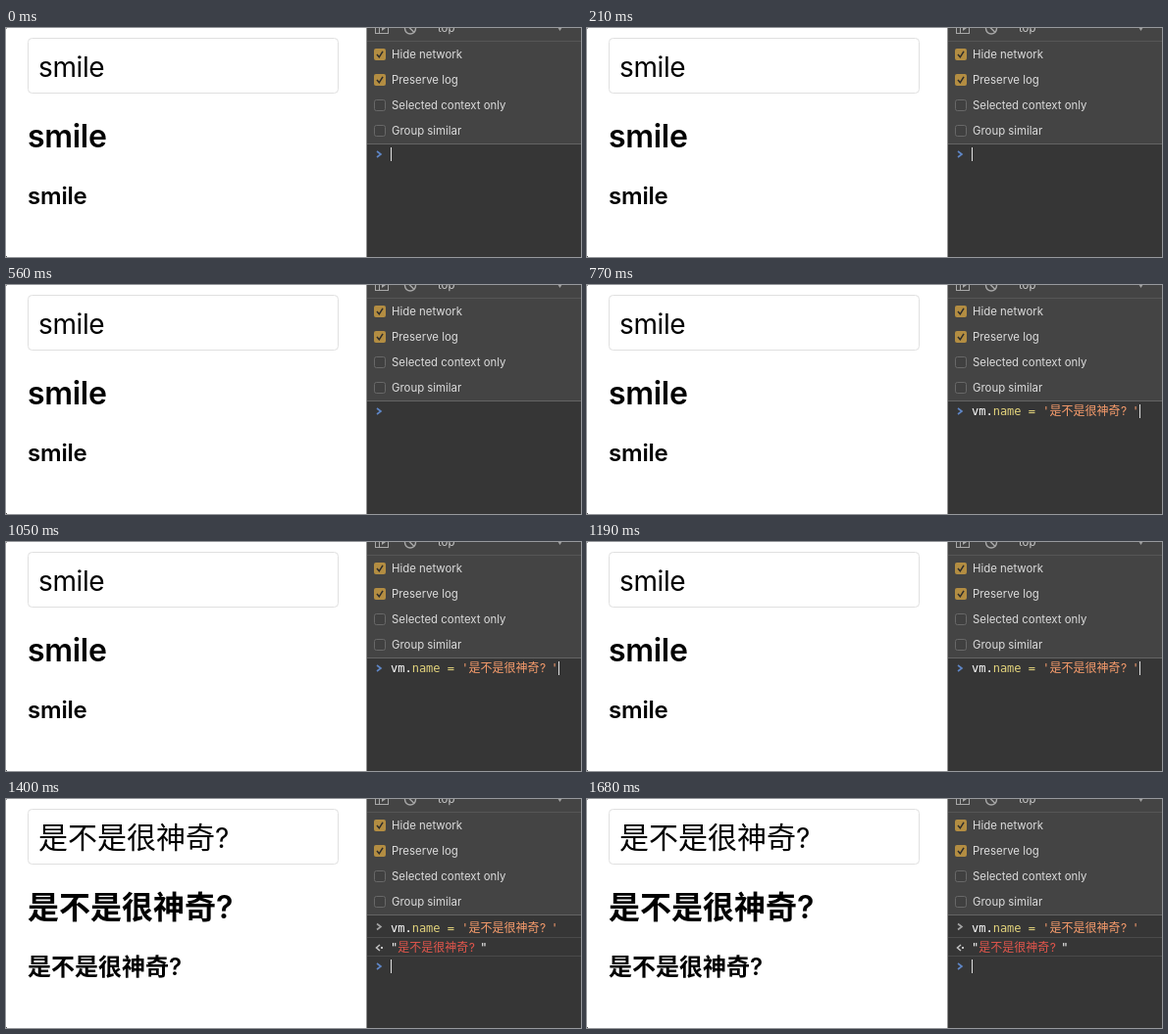
Animation of 586 by 234 pixels, one loop 1.82 s. Source, as an HTML page with a canvas:

```html
<!DOCTYPE html>
<html lang="zh-CN">
<head>
<meta charset="utf-8">
<title>Two-way binding</title>
<style>
html, body { margin: 0; width: 100%; height: 100%; overflow: hidden; background: #fff; }
canvas { display: block; }
</style>
</head>
<body>
<canvas id="stage" width="586" height="234"></canvas>
<script>
const ctx = document.getElementById('stage').getContext('2d');
const LOOP = 1820, CARET_OFF = 420, PASTE = 770, ENTER = 1260, RESULT = 1330;
const SANS = 'Inter, sans-serif';
const MONO = '"DejaVu Sans Mono", monospace';
const CJK = '"Noto Sans CJK SC", "Noto Sans CJK", sans-serif';
const PHRASE = '是不是很神奇';
const BLUE = '#5f87c8', GREY = '#a4a4a4', LIGHT = '#fff';
const YELLOW = '#e2d37c', ORANGE = '#f79c6c', RED = '#e2564c';
const RULE = '#4a4a4a';

function rect(x, y, w, h, color) {
  ctx.fillStyle = color;
  ctx.fillRect(x, y, w, h);
}

function text(str, x, y, font, color, spacing = 0) {
  ctx.font = font;
  ctx.letterSpacing = spacing + 'px';
  ctx.fillStyle = color;
  ctx.fillText(str, x, y);
  return x + ctx.measureText(str).width;
}

function line(points, color, width = 1) {
  ctx.beginPath();
  points.forEach(([x, y]) => ctx.lineTo(x, y));
  ctx.strokeStyle = color;
  ctx.lineWidth = width;
  ctx.stroke();
}

function roundBox(x, y, w, h, r, fill, stroke) {
  ctx.beginPath();
  ctx.roundRect(x, y, w, h, r);
  ctx.fillStyle = fill;
  ctx.fill();
  if (stroke) {
    ctx.strokeStyle = stroke;
    ctx.lineWidth = 1;
    ctx.stroke();
  }
}

// The bound value, in Latin or Chinese, at one of three sizes
function value(changed, x, y, weight, latin, han, spacing) {
  if (!changed) {
    text('smile', x, y, `${weight} ${latin}px ${SANS}`, '#000', spacing);
    return;
  }
  const end = text(PHRASE, x, y, `${weight} ${han}px ${CJK}`, '#000');
  text('?', end, y, `${weight} ${latin}px ${SANS}`, '#000');
}

function page(changed) {
  rect(0, 0, 367, 234, '#fff');
  rect(0, 233, 1, 1, '#555');
  rect(0, 0, 1, 1, '#999');
  roundBox(22.5, 10.5, 316, 56, 4, '#fff', '#e0e0e0');
  value(changed, 33, 50, 400, 28, 30, -0.4);
  value(changed, 22, 122, 600, 32, 32, -0.3);
  value(changed, 22, 180, 600, 24, 24, -0.2);
}

function toolbar() {
  ctx.strokeStyle = '#a8a8a8';
  ctx.lineWidth = 1;
  ctx.strokeRect(376.5, -5.5, 13, 11);
  line([[380.5, -5], [380.5, 5]], '#a8a8a8');
  ctx.beginPath();
  ctx.moveTo(383, -3);
  ctx.lineTo(387, 0);
  ctx.lineTo(383, 3);
  ctx.fillStyle = '#a8a8a8';
  ctx.fill();
  ctx.beginPath();
  ctx.arc(412, 0.5, 5.5, 0, Math.PI * 2);
  ctx.lineWidth = 1.4;
  ctx.stroke();
  line([[408, -3.5], [416, 4.5]], '#a8a8a8', 1.4);
  text('top', 440, 4, `11.4px ${SANS}`, '#c8c8c8');
  ctx.beginPath();
  ctx.moveTo(562, -1);
  ctx.lineTo(567, -1);
  ctx.lineTo(564.5, 3);
  ctx.fillStyle = '#a0a0a0';
  ctx.fill();
  rect(368, 13, 218, 1, '#565656');
}

function option(label, y, checked) {
  if (checked) {
    roundBox(375, y - 6, 12, 12, 2, '#b38d42');
    line([[378, y], [380.3, y + 2.8], [384, y - 3.2]], '#2c2c2c', 1.5);
  } else {
    roundBox(375.5, y - 5.5, 11, 11, 2, '#404040', '#686868');
  }
  text(label, 393, y + 4, `11.4px ${SANS}`, '#dcdcdc');
}

function chevron(y, color) {
  line([[378, y - 3], [382, y], [378, y + 3]], color, 1.6);
}

function prompt(y, caret) {
  chevron(y, BLUE);
  if (caret) rect(392, y - 7, 1, 14, '#e0e0e0');
}

function quoted(x, y, mark, markColor, color) {
  const mono = `12px ${MONO}`;
  x = text(mark, x, y, mono, markColor);
  x = text(PHRASE, x, y, `12px ${CJK}`, color);
  text('?', x + 0.5, y, `12px ${SANS}`, color);
  return text(mark, x + 12, y, mono, markColor);
}

function command(y) {
  const mono = `12px ${MONO}`;
  let x = text('vm.', 392, y + 4, mono, LIGHT);
  x = text('name = ', x, y + 4, mono, YELLOW);
  return quoted(x, y + 4, "'", ORANGE, ORANGE);
}

function result(y) {
  line([[381, y - 3], [377.5, y], [381, y + 3]], '#c4c4c4', 1.5);
  rect(382, y - 1, 2, 2, '#c4c4c4');
  quoted(392, y + 4, '"', LIGHT, RED);
}

function consoleLog(t) {
  if (t < PASTE) {
    prompt(129, t < CARET_OFF);
  } else if (t < ENTER) {
    chevron(129, BLUE);
    rect(Math.round(command(129)), 122, 1, 14, '#e0e0e0');
  } else {
    const done = t >= RESULT;
    chevron(130.5, GREY);
    command(132);
    rect(368, 141, 218, 1, RULE);
    if (done) {
      result(152);
      rect(368, 160, 218, 1, RULE);
    }
    prompt(done ? 171 : 152, true);
  }
}

function devtools(t) {
  rect(367, 0, 1, 234, '#909090');
  rect(368, 0, 218, 234, '#363636');
  rect(368, 0, 218, 118, '#444');
  toolbar();
  option('Hide network', 27, true);
  option('Preserve log', 53, true);
  option('Selected context only', 79, false);
  option('Group similar', 105, false);
  rect(368, 118, 218, 1, '#646464');
  consoleLog(t);
}

function draw() {
  const t = performance.now() % LOOP;
  page(t >= ENTER);
  devtools(t);
  requestAnimationFrame(draw);
}
draw();
</script>
</body>
</html>
```
